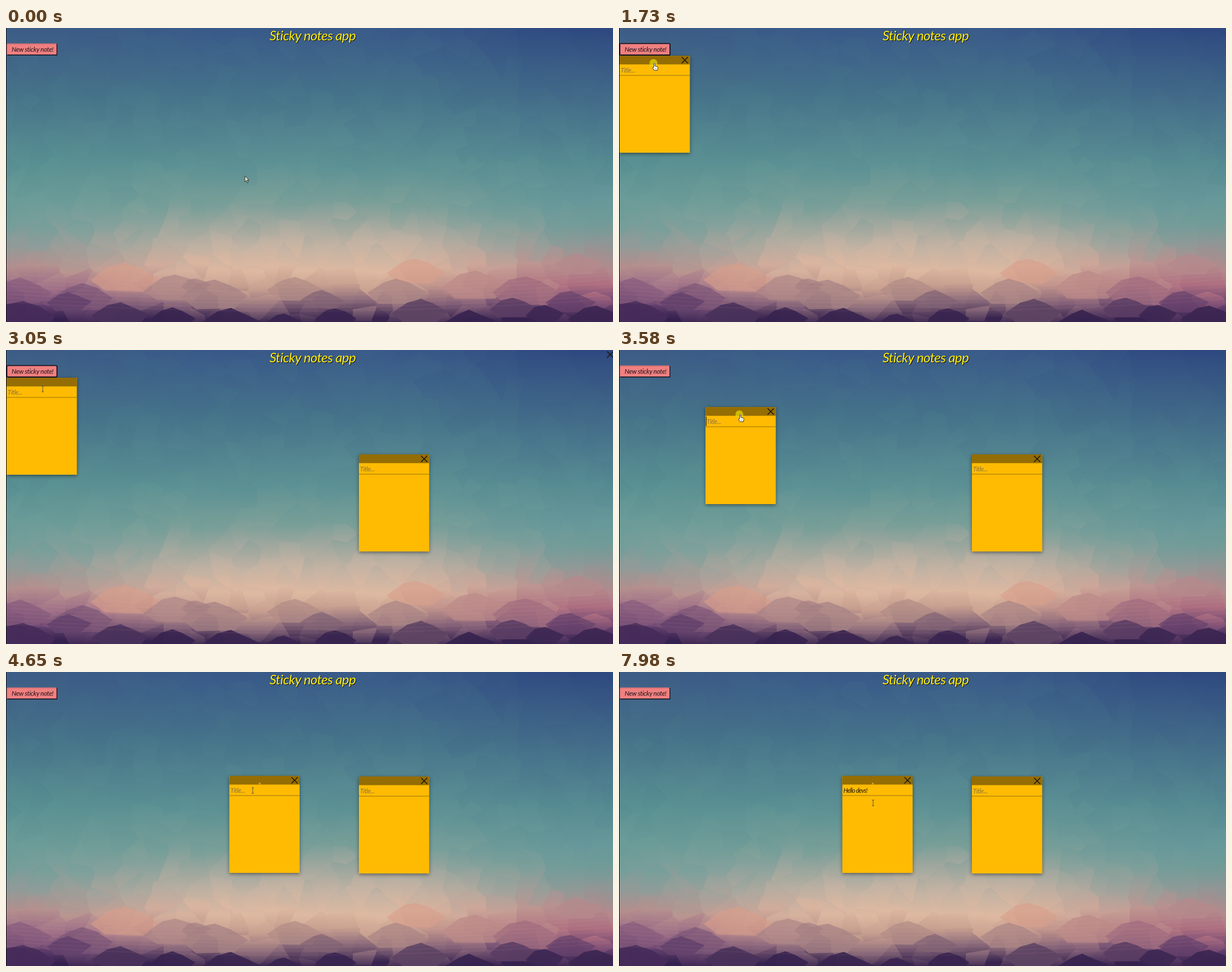
Write an HTML page with a canvas that moves like this. It is 1075 px wide and 521 px high and loops after 8 s.

```html
<!DOCTYPE html>
<html lang="en">
<head>
<meta charset="utf-8">
<title>Sticky notes app</title>
<style>
html, body { margin: 0; width: 100%; height: 100%; overflow: hidden; background: #35214f; }
canvas, svg { position: absolute; left: 0; top: 0; width: 1075px; height: 521px; }
text { font-family: Lato, "Open Sans", sans-serif; font-style: italic; letter-spacing: -.06em; white-space: pre; }
.wide { letter-spacing: -.025em; }
.note { filter: drop-shadow(0 2px 3px rgba(0, 0, 0, .45)); }
</style>
</head>
<body>
<canvas id="sky" width="1075" height="521"></canvas>
<svg id="stage" viewBox="0 0 1075 521">
  <defs>
    <g id="paper">
      <rect width="124.5" height="172" fill="#ffbb02"/>
      <rect width="124.5" height="15.5" fill="#946d04"/>
      <path d="M0 35h124.5" stroke="#8f6a08" stroke-width=".9"/>
    </g>
    <path id="cross" d="M-5.5-5.5 5.5 5.5M5.5-5.5-5.5 5.5" stroke="#151005" stroke-width="1.3"/>
  </defs>
  <g class="wide" font-size="24" text-anchor="middle">
    <text class="wide" x="544" y="23" fill="#111">Sticky notes app</text>
    <text class="wide" x="543" y="22" fill="#ffee10">Sticky notes app</text>
  </g>
  <rect x="1.5" y="27.5" width="89" height="20.5" rx="2" fill="#f08080"/>
  <path d="M2 47V28.300H90" fill="none" stroke="#c9646c"/>
  <path d="M90.200 28V47.800H2" fill="none" stroke="#14101c" stroke-width="1.4"/>
  <rect id="focus" x="1.5" y="27.5" width="89" height="20.5" rx="2" fill="none" stroke="#14101c" stroke-width="1.4"/>
  <text class="wide" x="10" y="42" font-size="11.5" fill="#1c1018">New sticky note!</text>
  <g id="notes"></g>
  <path id="speck" d="M447 199l2-4 3 4z" fill="#d8a21c"/>
  <circle id="press" r="7" fill="#e6d708" opacity=".72"/>
  <g id="arrow">
    <path d="M0 0V10.500L2.400 8.300 4.200 12.500 6 11.700 4.200 7.600H7.300Z" fill="#e8dcc4" stroke="#222" stroke-width=".9"/>
  </g>
  <g id="hand">
    <path d="M0 1.200Q1 0 2.200 1.200V5.500L6.500 6.500Q8 7 7.600 9L6.600 13H.8L-2 8.800Q-1.800 7 0 8Z" fill="#fff" stroke="#222" stroke-width=".9"/>
    <path d="M2.600 9v2M4.500 9v2" stroke="#555" stroke-width=".6"/>
  </g>
  <path id="beam" d="M-2-5H2M0-5V5M-2 5H2" fill="none" stroke="#5b5848"/>
</svg>
<script>
const W = 1075, H = 521, LOOP = 8000, STEP = 65;
const $ = id => document.getElementById(id);
const mix = (a, b, f) => a + (b - a) * f;

// ---------- background ----------
const ctx = $('sky').getContext('2d');
const hex = s => s.split(' ').map(c => [0, 2, 4].map(i => parseInt(c.substr(i, 2), 16)));
const levels = [0, 120, 240, 310, 345, 385, 425, 460, 490, 521];
const left = hex('3c5c86 467389 599092 6b9c98 749e9a 909b98 b38e8d 9a6a86 64406f 35214f');
const middle = hex('395a89 46748a 5c9194 7a9f98 9ea79e c4b3a3 deb9a1 c79f8f 8a6a7a 38244f');
const right = hex('2e4880 416988 568b92 67989a 6e9b98 8d9796 b38a8c ac6c80 6f4672 35214f');

let seed = 7;
const rand = () => (seed = seed * 16807 % 2147483647) / 2147483647;
const spread = n => (rand() - .5) * n;

// Sky colour at any point: three vertical ramps blended across the width.
function tone(x, y) {
  const u = Math.min(1, Math.max(0, x / W));
  const k = Math.min(1, 1.25 * (1 - Math.abs(2 * u - 1)));
  const glow = k * k * (3 - 2 * k), side = u < .5 ? left : right;
  const i = Math.max(0, Math.min(levels.length - 2, levels.findLastIndex(v => v <= y)));
  const f = Math.max(0, Math.min(1, (y - levels[i]) / (levels[i + 1] - levels[i])));
  const at = (ramp, j) => mix(ramp[i][j], ramp[i + 1][j], f);
  return `rgb(${[0, 1, 2].map(j => Math.round(mix(at(side, j), at(middle, j), glow)))})`;
}

function column(x, shift) {
  const g = ctx.createLinearGradient(0, shift, 0, H + shift);
  levels.forEach(y => g.addColorStop(y / H, tone(x, y)));
  return g;
}

// Keep the part of a polygon nearer to a than to b.
function clip(poly, a, b) {
  const mx = (a.x + b.x) / 2, my = (a.y + b.y) / 2;
  const side = p => (p[0] - mx) * (b.x - a.x) + (p[1] - my) * (b.y - a.y);
  const out = [];
  poly.forEach((p, i) => {
    const q = poly[(i + 1) % poly.length], sp = side(p), sq = side(q);
    if (sp <= 0) out.push(p);
    if (sp * sq < 0) {
      const f = sp / (sp - sq);
      out.push([mix(p[0], q[0], f), mix(p[1], q[1], f)]);
    }
  });
  return out;
}

function fillPoly(points, color) {
  ctx.fillStyle = ctx.strokeStyle = color;
  ctx.beginPath();
  points.forEach(p => ctx.lineTo(...p));
  ctx.closePath();
  ctx.fill();
}

function drawCells() {
  const cw = 42, ch = 27, sites = [];
  for (let r = 0; r < 22; r++)
    for (let c = 0; c < 28; c++)
      sites.push({ r, c, x: (c - .5 + rand()) * cw, y: (r - .5 + rand()) * ch, shift: spread(17) });
  for (const s of sites) {
    let poly = [[s.x - 90, s.y - 70], [s.x + 90, s.y - 70], [s.x + 90, s.y + 70], [s.x - 90, s.y + 70]];
    for (const n of sites)
      if (n !== s && Math.abs(n.r - s.r) < 4 && Math.abs(n.c - s.c) < 4) poly = clip(poly, s, n);
    fillPoly(poly, column(s.x, s.shift));
    ctx.stroke();
  }
}

// A faceted hill: its summit and half width, with loose shoulders.
function peak(x, y, w, color) {
  const at = (dx, dy) => [x + dx * w + spread(6), y + dy * w + spread(4)];
  fillPoly([at(-1, .5), at(-.45, .12), [x, y], at(.5, .18), at(1, .45), at(.6, .85), at(-.6, .85)], color);
}

const clouds = [[210, 416, 60], [725, 409, 50]];
const hills = [
  [25, 442, 55], [135, 452, 55], [300, 437, 55], [370, 446, 60], [335, 444, 26], [512, 441, 50], [560, 464, 38],
  [690, 444, 52], [832, 430, 60], [920, 440, 60], [1000, 466, 45], [1012, 399, 42]
];
const rocks = [
  [30, 484, 60], [110, 468, 40], [203, 486, 50], [295, 495, 40], [398, 496, 55], [493, 506, 35], [583, 497, 36],
  [735, 480, 50], [820, 499, 45], [897, 478, 42], [955, 491, 35], [1045, 492, 50]
];

function drawBackground() {
  drawCells();
  ctx.globalAlpha = .6;
  for (const [x, y, w] of clouds) peak(x, y, w, '#d99f8a');
  ctx.globalAlpha = .7;
  for (const [x, y, w] of hills) peak(x, y, w, tone(x, y + 30));
  ctx.globalAlpha = .9;
  for (const [x, y, w] of rocks) peak(x, y, w, tone(x, y + 26));
  ctx.globalAlpha = 1;
  ctx.strokeStyle = 'rgba(225,165,160,.06)';
  ctx.lineWidth = 2;
  for (let y = 436; y < 490; y += 7) {
    ctx.beginPath();
    ctx.moveTo(0, y);
    ctx.quadraticCurveTo(W / 2, y + 36, W, y - 5);
    ctx.stroke();
  }
  ctx.fillStyle = '#0c0c12';
  ctx.fillRect(0, 0, 1, H);
}

// ---------- motion ----------
const smooth = f => f * f * (3 - 2 * f);
const fling = f => 1 - (1 - f) ** 5;

const HOME = { x: 1, y: 49 }, GRIP = { x: 60.5, y: 13 };
const drags = [
  { born: 1130, start: 1730, end: 2180, release: 2400, x: 625, y: 185 },
  { born: 2960, start: 3510, end: 4210, release: 4210, x: 395.5, y: 184 }
];
const gripMove = d => ({ start: d.start, end: d.end, x: d.x + GRIP.x, y: d.y + GRIP.y, ease: fling });
const move = (start, end, x, y) => ({ start, end, x, y, ease: smooth });
const moves = [
  move(55, 920, 32, 44), move(1330, 1590, 61.5, 62), gripMove(drags[0]),
  move(2590, 2850, 62, 42), move(2980, 3050, 65, 69), move(3250, 3380, 61.5, 62), gripMove(drags[1]),
  move(4210, 4290, 437, 210), move(7960, 7980, 450, 232)
];
const presses = [[1060, 1130], [2900, 2960], ...drags.map(d => [d.start, d.release])];
const phrase = 'Hello devs!';
const keyTimes = [4980, 5710, 5850, 5980, 6110, 6250, 6340, 6440, 6640, 6780, 7050];
const within = (t, spans) => spans.some(([a, b]) => t >= a && t < b);

// The screen refreshes in steps while something moves.
function progress({ start, end, ease }, t) {
  if (t >= end) return 1;
  return t < start ? 0 : ease(Math.floor((t - start) / STEP) * STEP / (end - start));
}

function pointerPos(t) {
  let x = 423, y = 262;
  for (const m of moves) {
    const f = progress(m, t);
    x = mix(x, m.x, f);
    y = mix(y, m.y, f);
  }
  return { x, y };
}

function notePos(d, t) {
  const f = progress({ ...d, ease: fling }, t);
  return { x: mix(HOME.x, d.x, f), y: mix(HOME.y, d.y, f) };
}

function makeNote() {
  const g = document.createElementNS('http://www.w3.org/2000/svg', 'g');
  g.innerHTML = `<g class="body"><use href="#paper" class="note"/>
    <text x="2" y="30" font-size="11"></text>
    <path class="caret" d="M0 17V33.500" stroke="#1c1608"/></g>
    <use href="#cross" class="close"/>`;
  $('notes').append(g);
  const part = s => g.querySelector(s);
  return { g, body: part('.body'), text: part('text'), caret: part('.caret'), close: part('.close') };
}

const views = drags.map(makeNote);
const show = (el, on) => { el.style.display = on ? '' : 'none'; };
const place = (el, x, y) => el.setAttribute('transform', `translate(${x} ${y})`);

function drawNote(d, v, t, typed, caretOn) {
  show(v.g, t >= d.born);
  if (t < d.born) return;
  const p = notePos(d, t), held = t >= d.start;
  place(v.body, p.x, p.y);
  place(v.close, held ? p.x + 115.5 : 1070, held ? p.y + 8 : 8);
  v.text.textContent = typed || 'Title...';
  v.text.setAttribute('class', typed ? '' : 'wide');
  v.text.setAttribute('fill', typed ? '#1c1608' : '#857044');
  show(v.caret, caretOn);
  if (caretOn) place(v.caret, typed ? 2 + v.text.getComputedTextLength() : 1.3, 0);
}

function pointerKind(t, c, pressed) {
  if (pressed || c.x < 91 && c.y > 26 && c.y < 49) return 'hand';
  let kind = 'arrow';
  for (const d of drags) {
    const p = notePos(d, t), dx = c.x - p.x, dy = c.y - p.y;
    if (t >= d.born && dx >= 0 && dx < 124.5 && dy >= 0 && dy < 172) kind = dy < 15.5 ? 'hand' : 'beam';
  }
  return kind;
}

function draw(t) {
  const typed = phrase.slice(0, keyTimes.filter(k => t >= k).length);
  drawNote(drags[0], views[0], t, '', within(t, [[1795, 2260]]));
  drawNote(drags[1], views[1], t, typed, within(t, [[3575, 4650], [4980, 5510], [5710, 7580]]));

  const c = pointerPos(t), pressed = within(t, presses), kind = pointerKind(t, c, pressed);
  for (const id of ['arrow', 'hand', 'beam']) {
    show($(id), id === kind);
    place($(id), c.x, c.y);
  }
  show($('press'), pressed);
  place($('press'), c.x - .5, c.y);
  show($('focus'), within(t, [[1060, 1795], [2900, 3575]]));
  show($('speck'), t >= 4210);
}

function tick() {
  draw(performance.now() % LOOP);
  requestAnimationFrame(tick);
}

drawBackground();
tick();
</script>
</body>
</html>
```
